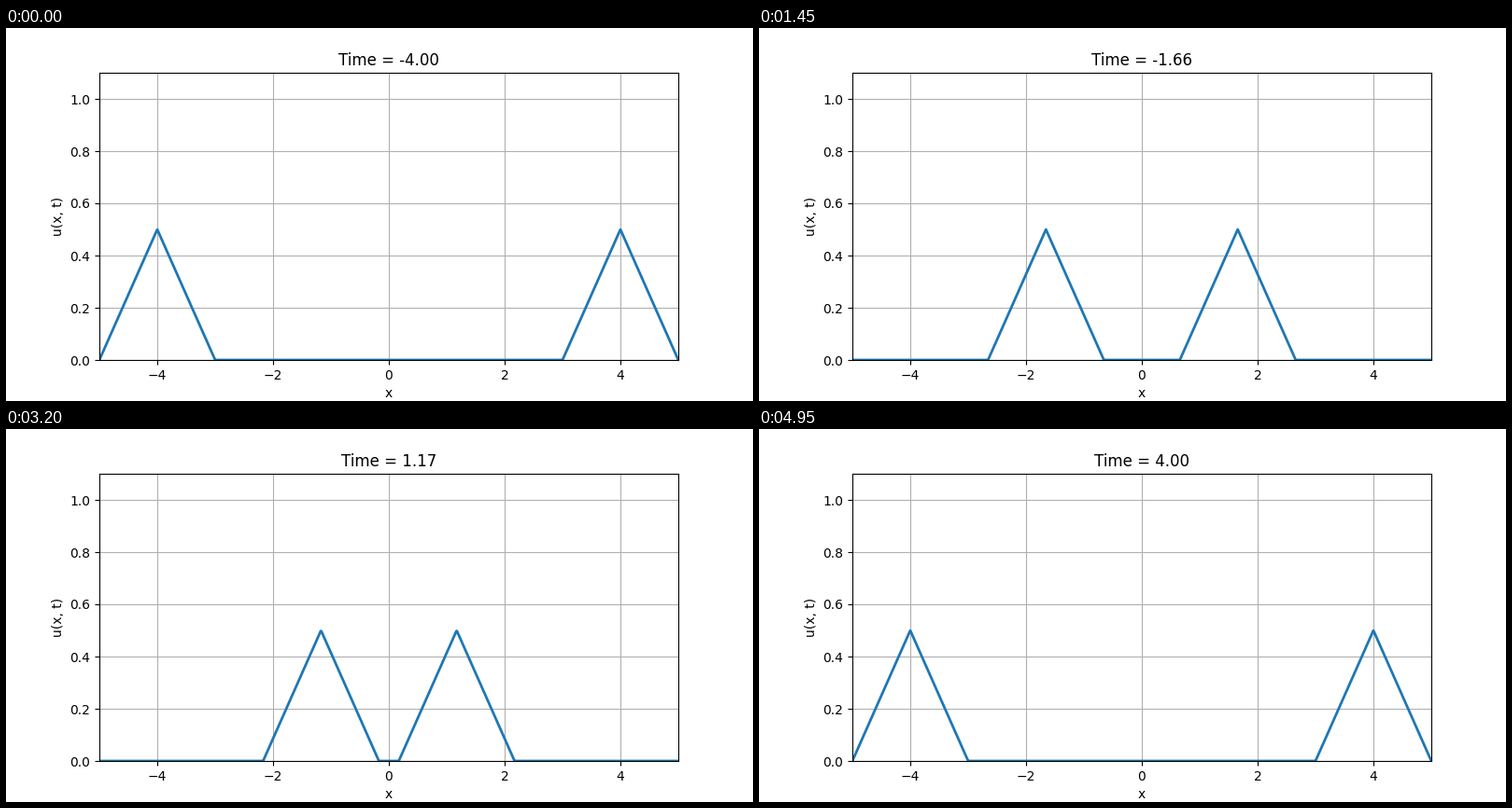
Animation of 800x400 px, one loop 5 s. Source, as a matplotlib script:

```python
import numpy as np
import matplotlib.pyplot as plt
from matplotlib.animation import FuncAnimation

FRAMES = 100
x = np.linspace(-5, 5, 1000)
times = np.linspace(-4, 4, FRAMES)


def hat(s):
    """Unit triangle centred on zero."""
    return np.maximum(0, 1 - np.abs(s))


def wave(t):
    """Two half-height pulses travelling in opposite directions."""
    return 0.5 * (hat(x - t) + hat(x + t))


fig, ax = plt.subplots(figsize=(8, 4), dpi=100)
line, = ax.plot(x, wave(times[0]), lw=2)
title = ax.set_title("")
ax.set_xlim(-5, 5)
ax.set_ylim(0, 1.1)
ax.set_xlabel("x")
ax.set_ylabel("u(x, t)")
ax.grid(True)


def update(i):
    t = times[i]
    line.set_ydata(wave(t))
    title.set_text(f"Time = {t:.2f}")
    return line, title


anim = FuncAnimation(fig, update, frames=FRAMES, interval=50,
                     repeat=True, repeat_delay=0, blit=False)
plt.show()
```
